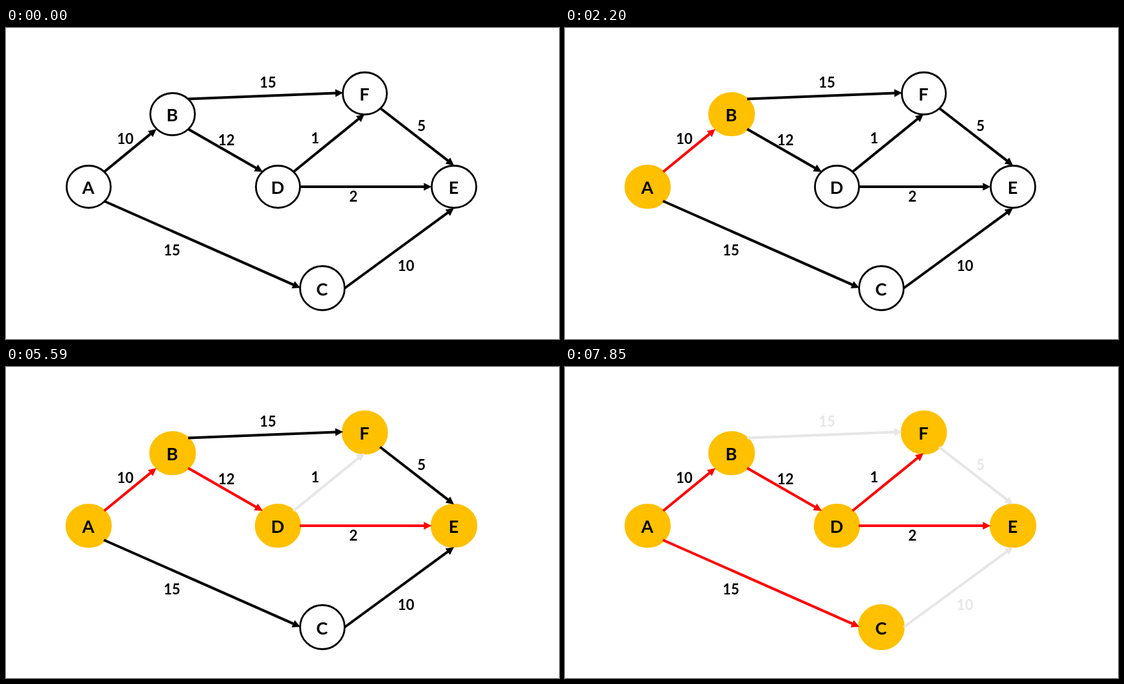
Write an HTML page that moves like this. It is 853 px wide and 480 px high and loops after 8.98 s.

```html
<!DOCTYPE html>
<html lang="en">
<head>
<meta charset="utf-8">
<title>Shortest paths from A</title>
<style>
  html, body { margin: 0; width: 100%; height: 100%; overflow: hidden; background: #fff; }
  svg { display: block; width: 853px; height: 480px; }
  text { font: bold 27px Lato, Carlito, sans-serif; text-anchor: middle; }
  .weight { font-size: 22px; }
</style>
</head>
<body>
<svg id="stage" viewBox="0 0 853 480"></svg>
<script>
const LOOP = 8980;
const COLORS = { k: '#000', r: '#f00', g: '#e6e6e6' };
const YELLOW = '#ffc000';

// name: [cx, cy, rx, ry]
const NODES = {
  A: [127.5, 245, 34, 32.5],
  B: [257, 133, 34.4, 32.5],
  C: [488, 401.5, 34.4, 34],
  D: [419.5, 245, 34, 32.5],
  E: [691, 245, 34.4, 32.5],
  F: [553.5, 101, 34, 32.5]
};

// [x1, y1, x2, y2, weight, label x, label y]
const EDGES = [
  [151.5, 222, 232, 156, 10, 184, 171],    // AB
  [281, 109.5, 520, 100, 15, 404, 84],     // BF
  [281, 156, 396, 222, 12, 340, 173],      // BD
  [443.5, 222, 553, 133, 1, 477, 170],     // DF
  [453, 245, 656.5, 245, 2, 536, 260],     // DE
  [577, 123.5, 691, 212, 5, 641, 151],     // FE
  [522.5, 401.5, 691, 278, 10, 617, 367],  // CE
  [151, 267, 454, 401, 15, 256, 343]       // AC
];

// start time, visited nodes, edge colours, weights of unused edges faded
const STEPS = [
  [0,    '',       'kkkkkkkk'],
  [1070, 'A',      'kkkkkkkk'],
  [2200, 'AB',     'rkkkkkkk'],
  [3330, 'ABD',    'rkrkkkkk'],
  [4460, 'ABDF',   'rkrrkkkk'],
  [5590, 'ABDEF',  'rkrgrkkk'],
  [6720, 'ABCDEF', 'gkgggkkr'],
  [7850, 'ABCDEF', 'rgrrrggr', true]
];

const stage = document.getElementById('stage');

function add(tag, attrs, parent = stage, content = '') {
  const el = document.createElementNS('http://www.w3.org/2000/svg', tag);
  for (const key in attrs) el.setAttribute(key, attrs[key]);
  el.textContent = content;
  return parent.appendChild(el);
}

const ellipses = {};
for (const [name, [cx, cy, rx, ry]] of Object.entries(NODES)) {
  ellipses[name] = add('ellipse', { cx, cy, rx, ry });
  add('text', { x: cx - 0.5, y: cy + 11 }, stage, name);
}

const arrows = EDGES.map(([x1, y1, x2, y2, weight, x, y]) => {
  const length = Math.hypot(x2 - x1, y2 - y1);
  const angle = Math.atan2(y2 - y1, x2 - x1) * 180 / Math.PI;
  const arrow = add('path', {
    d: `M0-2H${length - 12}v-4l12 6l-12 6v-4H0z`,
    transform: `translate(${x1} ${y1}) rotate(${angle})`
  });
  const label = add('text', { x, y: y + 7.5, class: 'weight' }, stage, weight);
  return { arrow, label };
});

function show([, visited, colors, fadeWeights]) {
  for (const name in ellipses) {
    const on = visited.includes(name);
    ellipses[name].setAttribute('fill', on ? YELLOW : '#fff');
    ellipses[name].setAttribute('stroke', on ? YELLOW : '#000');
    ellipses[name].setAttribute('stroke-width', on ? 3.2 : 2.8);
  }
  arrows.forEach(({ arrow, label }, i) => {
    arrow.setAttribute('fill', COLORS[colors[i]]);
    label.setAttribute('fill', fadeWeights && colors[i] === 'g' ? COLORS.g : COLORS.k);
  });
}

const start = performance.now();
let current;

function tick() {
  const time = (performance.now() - start) % LOOP;
  const step = STEPS.filter(([from]) => from <= time).pop();
  if (step !== current) show(current = step);
  requestAnimationFrame(tick);
}
tick();
</script>
</body>
</html>
```
